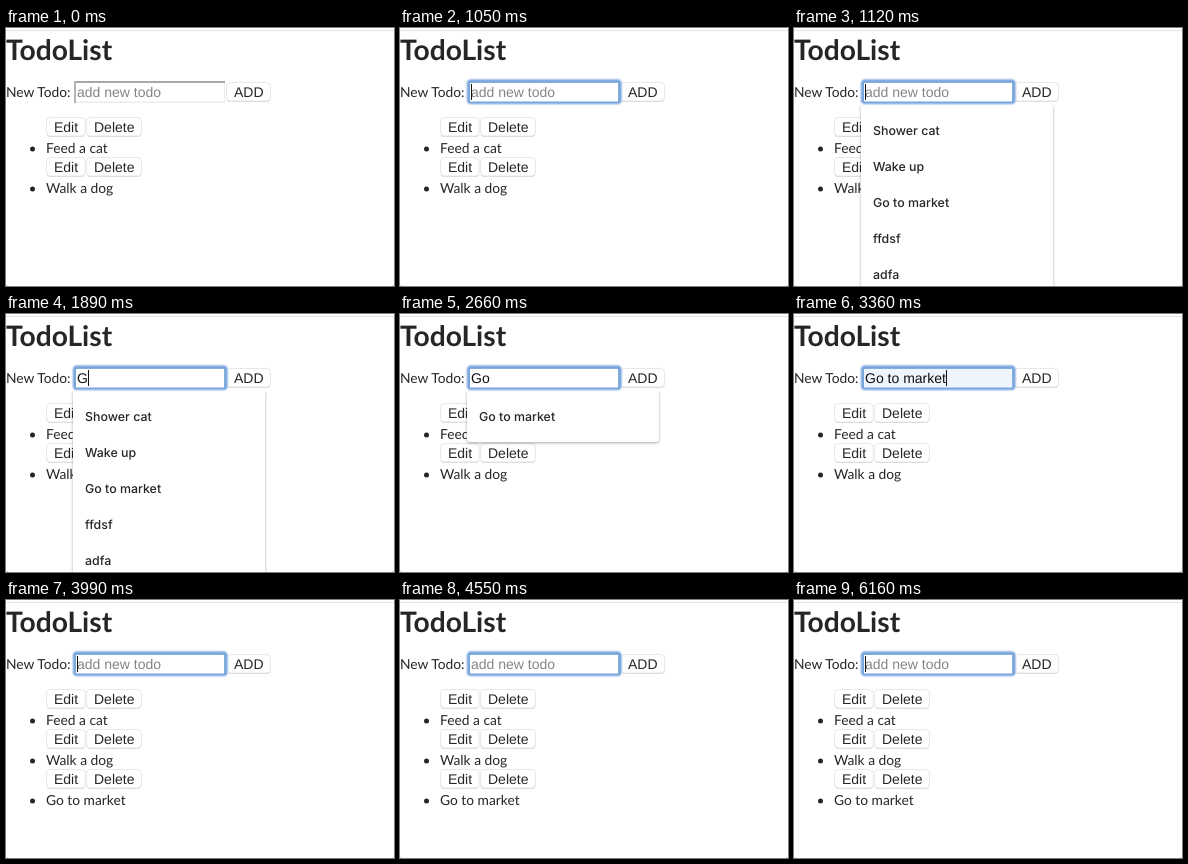
Animation of 388 by 258 pixels, one loop 6.65 s. Source, as an HTML page with a canvas:

```html
<!DOCTYPE html>
<html lang="en">
<head>
<meta charset="utf-8">
<title>TodoList</title>
<style>
  html, body { margin: 0; width: 100%; height: 100%; overflow: hidden; background: #fff; }
  canvas { display: block; }
</style>
</head>
<body>
<canvas id="stage" width="388" height="258"></canvas>
<script>
const ctx = document.getElementById('stage').getContext('2d');
ctx.textRendering = 'geometricPrecision';
const LOOP = 6650;
const LATO = '13.8px Lato, sans-serif';
const ARIAL = '14px "Liberation Sans", Arial, sans-serif';
const SMALL = '11px "Liberation Sans", Arial, sans-serif';
const MENU = '500 12.4px Inter, sans-serif';
const INK = '#262626';
const HISTORY = ['Shower cat', 'Wake up', 'Go to market', 'ffdsf', 'adfa'];
const MATCH = ['Go to market'];
const TODOS = ['Feed a cat', 'Walk a dog', 'Go to market'];

// Each state holds from its start time until the next one begins.
const STATES = [
  { at: 0 },
  { at: 1050, focus: true, caret: true },
  { at: 1120, focus: true, caret: true, menu: HISTORY },
  { at: 1540, focus: true, menu: HISTORY },
  { at: 1890, focus: true, caret: true, text: 'G', menu: HISTORY },
  { at: 1960, focus: true, caret: true, text: 'G', menu: MATCH },
  { at: 2170, focus: true, caret: true, text: 'Go', menu: MATCH },
  { at: 2660, focus: true, text: 'Go', menu: MATCH },
  { at: 2940, focus: true, text: 'Go to market', menu: MATCH, preview: true },
  { at: 3360, focus: true, caret: true, text: 'Go to market', filled: true },
  { at: 3920, focus: true, caret: true, added: true },
  { at: 4550, focus: true, added: true },
  { at: 5110, focus: true, caret: true, added: true },
  { at: 5600, focus: true, added: true },
  { at: 6160, focus: true, caret: true, added: true }
];

function rect(x, y, w, h, color) {
  ctx.fillStyle = color;
  ctx.fillRect(x, y, w, h);
}

function label(text, x, y, font, color = INK) {
  ctx.font = font;
  ctx.fillStyle = color;
  ctx.fillText(text, x, y);
}

function roundBox(x, y, w, h, r) {
  ctx.beginPath();
  ctx.roundRect(x, y, w, h, r);
}

function button(text, x, y) {
  ctx.font = ARIAL;
  const w = ctx.measureText(text).width + 15;
  roundBox(x + 0.5, y + 1, w - 0.5, 19, 4);
  ctx.fillStyle = '#d6d6d6';
  ctx.fill();
  roundBox(x + 0.5, y + 0.5, w - 0.5, 18.5, 4);
  ctx.fillStyle = '#fff';
  ctx.fill();
  ctx.strokeStyle = '#e8e8e8';
  ctx.lineWidth = 1;
  ctx.stroke();
  label(text, x + 8, y + 15, ARIAL);
}

function todo(text, i) {
  const y = 89 + i * 40;
  button('Edit', 40, y);
  button('Delete', 80, y);
  ctx.beginPath();
  ctx.arc(26.5, y + 32, 2.5, 0, Math.PI * 2);
  ctx.fillStyle = INK;
  ctx.fill();
  label(text, 40, y + 36, LATO);
}

function field({ focus, caret, text = '', preview, filled }) {
  if (focus) {
    [['#dce8f6', 6.5], ['#a9c6ea', 4.5], ['#79a6dc', 2.5]].forEach(([color, width]) => {
      roundBox(69, 53.5, 150.5, 20.5, 2);
      ctx.strokeStyle = color;
      ctx.lineWidth = width;
      ctx.stroke();
    });
  } else {
    rect(68, 53, 151, 22, '#ececec');
    rect(68, 53, 151, 2, '#a8a8a8');
    rect(68, 53, 2, 22, '#b4b4b4');
  }
  rect(70, 55, 148, 18.5, preview || filled ? '#eff5fd' : '#fff');
  if (text) label(text, 71, preview ? 68.5 : 69, preview ? SMALL : ARIAL, '#111');
  else label('add new todo', 71, 69, ARIAL, '#858585');
  if (caret) {
    ctx.font = ARIAL;
    rect(71 + Math.round(ctx.measureText(text).width), 56, 1, 16, '#111');
  }
}

function dropdown(items, selected) {
  const h = items.length * 36 + 15;
  ctx.save();
  ctx.beginPath();
  ctx.rect(60, 77, 210, 181);
  ctx.clip();
  ctx.shadowColor = 'rgba(0,0,0,.35)';
  ctx.shadowBlur = 3;
  ctx.shadowOffsetY = 1;
  roundBox(67, 76, 192, h + 1, 3);
  ctx.fillStyle = '#fff';
  ctx.fill();
  ctx.restore();
  if (selected) rect(67, 84, 192, 36, '#d2d2d2');
  items.forEach((item, i) => label(item, 79, 106.5 + i * 36, MENU));
}

function draw(t) {
  const state = STATES.findLast(s => s.at <= t);
  rect(0, 0, 388, 258, '#fff');
  rect(0, 2, 388, 1, '#e3e3e3');
  rect(0, 257, 2, 1, '#ddd');
  rect(386, 257, 2, 1, '#ddd');
  label('TodoList', 0, 31.5, 'bold 28.2px Lato, sans-serif');
  label('New Todo:', 0, 69, LATO);
  button('ADD', 220, 54);
  TODOS.slice(0, state.added ? 3 : 2).forEach(todo);
  if (state.menu) dropdown(state.menu, state.preview);
  field(state);
}

function tick() {
  draw(performance.now() % LOOP);
  requestAnimationFrame(tick);
}
tick();
</script>
</body>
</html>
```
